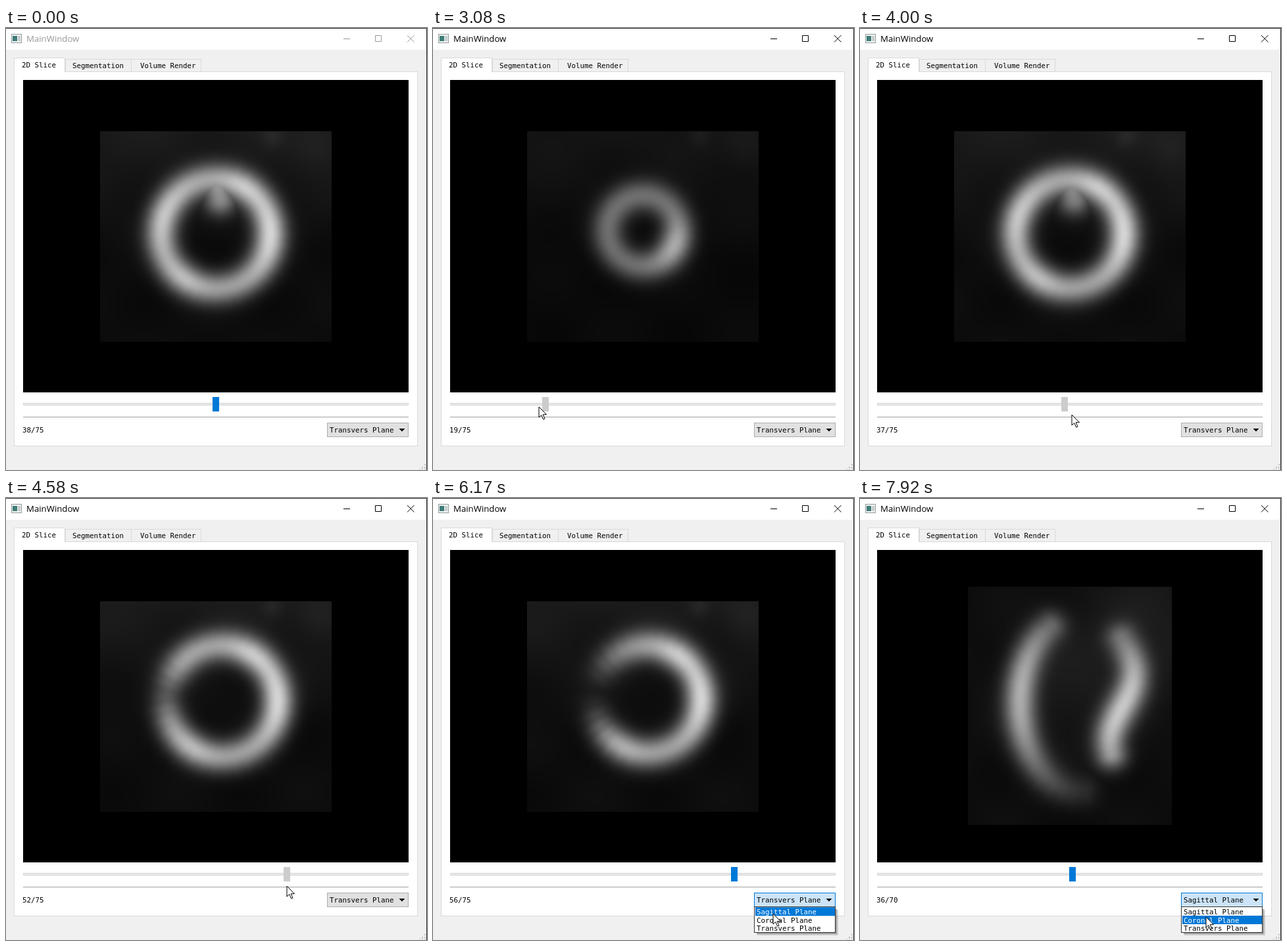
These frames come from a looping animation (640 by 672 pixels, 8 s). An HTML page with a canvas:

```html
<!DOCTYPE html>
<html lang="en">
<head>
<meta charset="utf-8">
<title>MainWindow</title>
<style>
  html, body { margin: 0; width: 640px; height: 672px; overflow: hidden; background: #f0f0f0; }
  svg, canvas { position: absolute; left: 0; top: 0; display: block; }
  #view { left: 26px; top: 79px; }
  .mono { font: 10.8px "DejaVu Sans Mono", monospace; fill: #000; white-space: pre; }
  .title { font: 13.2px "Open Sans", sans-serif; }
</style>
</head>
<body>
<svg width="640" height="672" viewBox="0 0 640 672">
  <rect width="640" height="33" fill="#fff"/>
  <path d="M0 .5H639.5V672" fill="none" stroke="#2a2a2a"/>
  <rect x="8.5" y="9.5" width="15" height="13" fill="#f4f4f4" stroke="#8e9a9a"/>
  <rect x="10" y="12" width="7" height="8" fill="#3f7d78"/>
  <rect x="18" y="12" width="4" height="8" fill="#c6cdcd"/>
  <text id="title" class="title" x="31" y="21">MainWindow</text>
  <g id="buttons" fill="none">
    <path d="M513 16.5H523M561.5 11.5H570.5V20.5H561.5Z"/>
    <path d="M610 11L620.5 21.5M620.5 11L610 21.5"/>
  </g>

  <g stroke="#d9d9d9">
    <rect x="90.5" y="47.5" width="100" height="19" fill="#f0f0f0"/>
    <rect x="190.5" y="47.5" width="106" height="19" fill="#f0f0f0"/>
    <rect x="12.5" y="66.5" width="613" height="569" fill="#fff"/>
    <path d="M12.5 67V45.5H89.5V67" fill="#fff"/>
  </g>
  <g class="mono">
    <text x="24" y="60">2D Slice</text>
    <text x="101" y="61">Segmentation</text>
    <text x="204" y="61">Volume Render</text>
    <text id="count" x="25" y="615"></text>
  </g>

  <rect x="26.5" y="570.5" width="585" height="3" fill="#e7eaea" stroke="#d6d6d6"/>
  <rect id="handle" y="561" width="10" height="22"/>
  <path d="M26 591.5H612" stroke="#a0a0a0"/>
  <rect id="combo" x="488.5" y="600.5" width="123" height="21"/>
  <text id="plane" class="mono" x="492" y="615"></text>
  <path d="M597.5 609H606.5L602 613.5Z"/>
  <path d="M637 663v2m0 2v2m-4-2v2m4 1v1m-4-1v1m-4-1v1" stroke="#bfbfbf" stroke-width="2"/>

  <g id="popup">
    <path d="M492 660H611V625H614V663H492Z" opacity=".35"/>
    <path d="M493 663H614V626H616V665H493Z" opacity=".14"/>
    <rect x="488.5" y="621.5" width="123" height="39" fill="#fff" stroke="#333"/>
    <rect id="hilite" x="490" width="121" height="13" fill="#0078d7"/>
    <g id="items" class="mono"></g>
  </g>
</svg>
<canvas id="view" width="586" height="475"></canvas>
<svg id="cursor" width="14" height="22" viewBox="-1 -1 14 22">
  <path d="M0 0V16L3.8 12.5L6.6 19L9 18L6.2 11.7H11.5Z" fill="#fff" stroke="#000"/>
</svg>

<script>
const LOOP = 8000, FRAMES = 96, STEP = LOOP / FRAMES;
const PLANES = ["Sagittal Plane", "Coronal Plane", "Transvers Plane"];
const GRAB = 1920, RELEASE = 5080, PICK = 6330;
const $ = id => document.getElementById(id);
const set = (id, attrs) => { for (const k in attrs) $(id).setAttribute(k, attrs[k]); };
const mix = (a, b, k) => a + (b - a) * k;
const clamp = k => Math.min(1, Math.max(0, k));
const smooth = (a, b, v) => { const k = clamp((v - a) / (b - a)); return k * k * (3 - 2 * k); };
const rad = deg => deg * Math.PI / 180;

// Pointer waypoints: time, x, y
const POINTER = [
  [920, 569, 595], [1420, 330, 560], [1750, 314, 570], [GRAB, 314, 573], [2170, 306, 575],
  [3080, 162, 576], [3200, 146, 577], [4000, 321, 588], [4500, 426, 590], [4580, 426, 590],
  [4850, 480, 588], [RELEASE, 457, 576], [5170, 446, 572], [5750, 600, 610], [5920, 600, 612],
  [6170, 517, 632], [PICK, 517, 632], [6900, 610, 616], [7500, 600, 612], [7920, 526, 637]
];

function pointer(t) {
  let i = 0;
  while (i < POINTER.length - 2 && t > POINTER[i + 1][0]) i++;
  const [a, b] = [POINTER[i], POINTER[i + 1]];
  const k = clamp((t - a[0]) / (b[0] - a[0]));
  return [mix(a[1], b[1], k), mix(a[2], b[2], k)];
}

// The slider trails the pointer slightly
function sliceAt(t) {
  if (t < GRAB) return 38;
  const x = pointer(Math.min(t - 60, RELEASE))[0];
  return Math.round(1 + (x - 31) * 74 / 575);
}

const lobe = (deg, at, s) => Math.exp((Math.cos(rad(deg - at)) - 1) / s);
const spot = (x, y, cx, cy, s) => Math.exp(-((x - cx) ** 2 + (y - cy) ** 2) / (s * s));

// Heart wall across the axis: a ring that widens, then opens on the left
function ring(v) {
  const full = smooth(19, 38, v), gap = smooth(46, 57, v);
  const cx = 319 + 13 * smooth(38, 52, v), cy = 313 - (v - 36) ** 2 / 58;
  const size = 86 - 33 * ((v - 46) / 27) ** 2;
  const line = [];
  for (let d = 0; d <= 360; d += 10) {
    const r = size * (1 - .07 * gap * Math.cos(rad(d)));
    let b = mix(.43, .62, full) + .27 * lobe(d, mix(25, 0, full), .25)
      + full * (.2 * (1 - gap) * lobe(d, 200, .25) + .18 * lobe(d, 300, .08) + .15 * lobe(d, 125, .08));
    b *= 1 - gap * lobe(d, 188, .02 + .22 * gap * gap);
    line.push([cx + r * Math.cos(rad(d)), cy + r * Math.sin(rad(d)), b]);
  }
  const bump = clamp(1 - Math.abs(v - 38) / 10);
  return [line, [[322, 240, .6 * bump], [326, 260, .55 * bump]]];
}

// Heart wall along the axis: an elliptic arc and a bent column
function walls() {
  const left = [], right = [];
  for (let k = 0; k <= 1; k += 1 / 16) {
    const d = mix(240, 88, k);
    left.push([335 + 92 * Math.cos(rad(d)), 312 + 134 * Math.sin(rad(d)), .7 * lobe(d, 187, .71)]);
    right.push([398 + 18 * Math.sin(5.2 * k), mix(214, 388, k), .44 + .38 * Math.sin(2.6 * k)]);
  }
  return [left, right];
}

function glow(x, y, lines, w) {
  let best = 0;
  for (const line of lines) for (let i = 1; i < line.length; i++) {
    const [ax, ay, ab] = line[i - 1], [bx, by, bb] = line[i];
    const dx = bx - ax, dy = by - ay;
    const k = clamp(((x - ax) * dx + (y - ay) * dy) / (dx * dx + dy * dy));
    best = Math.max(best, mix(ab, bb, k) * spot(x, y, ax + k * dx, ay + k * dy, w));
  }
  return best;
}

// Faint tissue behind the wall
function haze(x, y, v, sagittal) {
  const wave = .012 * Math.sin(x / 31 + v / 9) * Math.cos(y / 27 - v / 13);
  if (sagittal) return .05 + wave + .06 * spot(x, y, 450, 190, 120) + .05 * spot(x, y, 310, 290, 110);
  return mix(.5, 1, clamp(v / 36)) * (.05 + wave + .06 * clamp(1 - (y - 157) / 190)
    + .05 * spot(x, y, 405, 165, 16) + .04 * spot(x, y, 475, 180, 34));
}

const ctx = $("view").getContext("2d");
const small = document.createElement("canvas");
let shown = "";

function drawSlice(sagittal, v) {
  const key = sagittal + ":" + v;
  if (key === shown) return;
  shown = key;
  const [x0, y0, w, h] = sagittal ? [164, 135, 310, 362] : [143, 157, 352, 320];
  const lines = sagittal ? walls() : ring(v);
  const cols = small.width = Math.round(w / 4), rows = small.height = Math.round(h / 4);
  const sc = small.getContext("2d"), img = sc.createImageData(cols, rows);
  for (let j = 0, p = 0; j < rows; j++) for (let i = 0; i < cols; i++, p += 4) {
    const x = x0 + (i + .5) * w / cols, y = y0 + (j + .5) * h / rows;
    const base = haze(x, y, v, sagittal);
    const tone = 238 * (base + (1 - base) * glow(x, y, lines, 24));
    img.data.set([tone, tone, tone, 255], p);
  }
  sc.putImageData(img, 0, 0);
  ctx.fillStyle = "#000";
  ctx.fillRect(0, 0, 586, 475);
  ctx.imageSmoothingQuality = "high";
  ctx.drawImage(small, x0 - 26, y0 - 79, w, h);
}

const items = PLANES.map((name, i) => {
  const el = document.createElementNS("http://www.w3.org/2000/svg", "text");
  el.textContent = name;
  el.setAttribute("x", 492);
  el.setAttribute("y", 633 + i * 12.7);
  $("items").append(el);
  return el;
});

function render(time) {
  const t = Math.floor((time % LOOP + 5) / STEP) % FRAMES * STEP + 4;
  const active = t >= GRAB, sagittal = t >= PICK;
  const pressed = active && t < RELEASE;
  const open = t >= 5920 && t < PICK || t >= 7500;
  const [x, y] = pointer(t);
  const total = sagittal ? 70 : 75;
  const value = sagittal ? 36 : sliceAt(t);

  drawSlice(sagittal, value);
  set("title", { fill: active ? "#000" : "#999" });
  set("buttons", { stroke: active ? "#000" : "#999" });
  set("handle", {
    x: Math.round(26 + (value - 1) * 575 / (total - 1)),
    fill: pressed ? "#ccc" : "#0078d7"
  });
  $("count").textContent = value + "/" + total;
  $("plane").textContent = PLANES[sagittal ? 0 : 2];

  const hot = open || t >= RELEASE && x > 488 && x < 612 && y > 600 && y < 622;
  set("combo", { fill: hot ? "#cce4f7" : "#e1e1e1", stroke: hot ? "#0078d7" : "#adadad" });

  const row = y < 635 ? 0 : y < 648 ? 1 : 2;
  set("popup", { visibility: open ? "visible" : "hidden" });
  set("hilite", { y: 622.3 + row * 12.7 });
  items.forEach((el, i) => { el.style.fill = i === row ? "#fff" : "#000"; });

  const c = $("cursor").style;
  c.display = t >= POINTER[0][0] ? "block" : "none";
  c.left = Math.round(x) - 1 + "px";
  c.top = Math.round(y) - 1 + "px";
}

const start = performance.now();
function tick() {
  render(performance.now() - start);
  requestAnimationFrame(tick);
}
tick();
</script>
</body>
</html>
```
